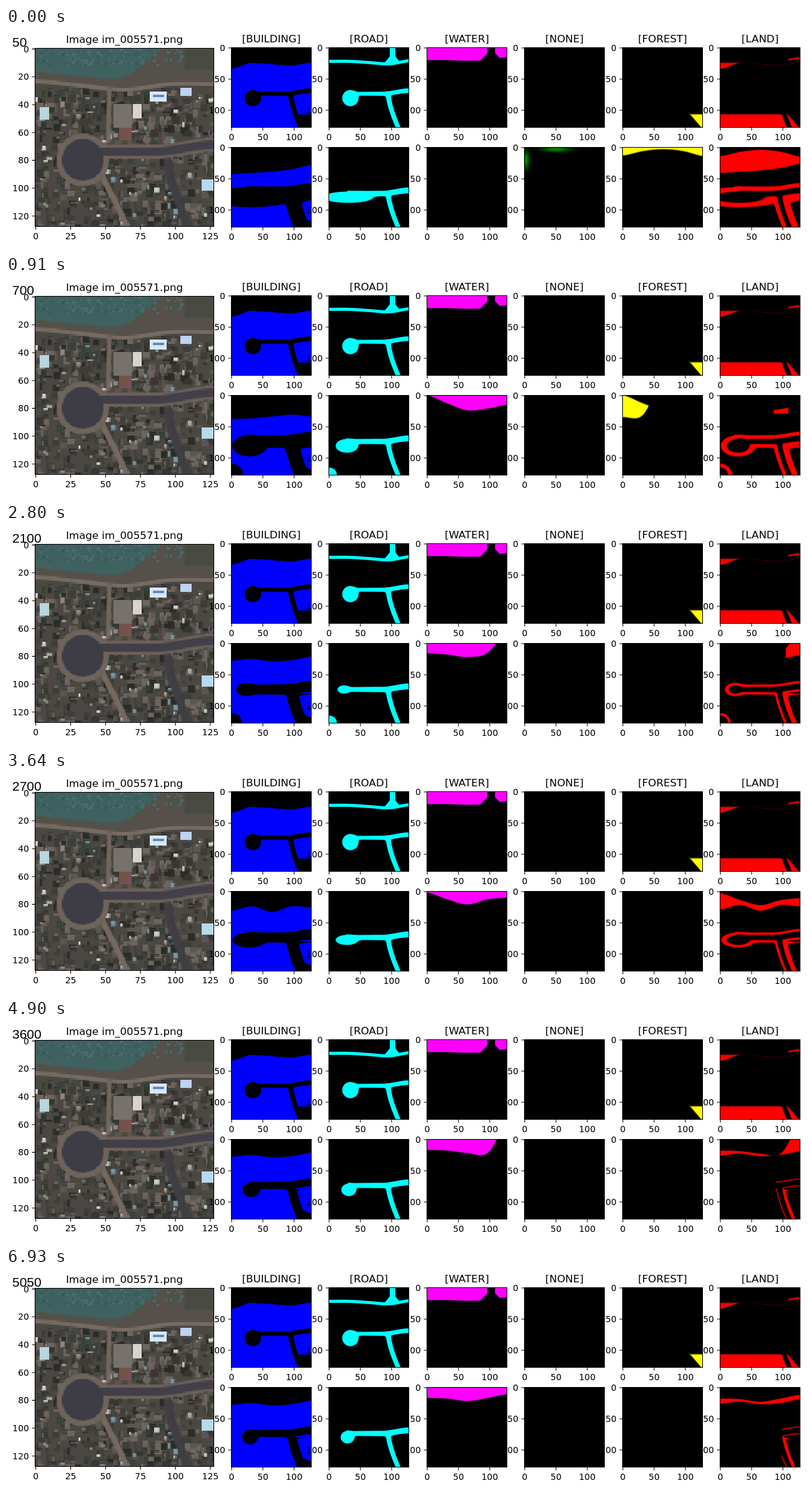
An HTML page with a canvas that plays this animation: 1280x353 px, repeating every 7 s.

```html
<!DOCTYPE html>
<html lang="en">
<head>
<meta charset="utf-8">
<title>Segmentation training</title>
<style>
html, body { margin: 0; width: 100%; height: 100%; overflow: hidden; background: #fff; }
canvas, svg { position: absolute; left: 0; top: 0; }
canvas { image-rendering: pixelated; background: #000; }
svg { width: 1280px; height: 353px; font-family: "DejaVu Sans", sans-serif; }
#count { font: 21px "Liberation Sans", Arial, sans-serif; }
</style>
</head>
<body>
<svg viewBox="0 0 1280 353"><path id="axes" fill="none" stroke="#000" stroke-width="1.1"/><text id="count" x="10" y="30"></text></svg>
<script>
const N = 128, STEP = 70, STEPS = 100;
const svg = document.querySelector('svg');
const count = document.getElementById('count');

const classes = [
  { name: 'BUILDING', rgb: [0, 0, 255], soft: 1 },
  { name: 'ROAD', rgb: [0, 255, 255], soft: 1 },
  { name: 'WATER', rgb: [255, 0, 255], soft: 1.4 },
  { name: 'NONE', rgb: [0, 140, 0], soft: 1 },
  { name: 'FOREST', rgb: [255, 255, 0], soft: 2.5 },
  { name: 'LAND', rgb: [255, 0, 0], soft: 1.8 }
];

// coast, water and trees are heights at five even places; bulb is x, y and radii
// of the turning circle; gap is bare land kept around roads; shore and verge are
// the x ranges where land shows.
const base = {
  coast: [28, 25, 29, 27, 21], water: [17, 18, 22, 17, 11], trees: Array(5).fill(-30),
  bulb: [29, 80, 11, 10], half: 3.5, gap: 1.5, corner: -9, haze: -5,
  shore: [-9, 140], verge: [-9, 140]
};
const poses = [
  { step: 0, coast: [43, 41, 39, 35, 28], water: Array(5).fill(-20), trees: [13, 6, 3, 6, 14],
    bulb: [30, 80, 40, 9], gap: 7, haze: 10 },
  { step: 13, coast: [38, 37, 34, 31, 34], water: [0, 13, 24, 21, 15], trees: [35, 31, -30, -30, -30],
    bulb: [28, 81, 18, 11], gap: 6, corner: 12, shore: [85, 108] },
  { step: 26, water: [10, 17, 23, 15, 8], bulb: [28, 77, 11, 11], gap: 3, shore: [94, 140], verge: [-9, 36] },
  { step: 40, water: [16, 18, 22, 15, -20], bulb: [23, 74, 10, 6.5], gap: 4, corner: 12, shore: [104, 140] },
  { step: 52, coast: [31, 24, 33, 24, 26], water: [2, 13, 21, 13, 10], bulb: [28, 78, 18, 8], gap: 4 },
  { step: 70, water: [17, 18, 22, 22, -25], bulb: [31, 81, 12, 10], verge: [89, 140] },
  { step: 99, verge: [98, 140] }
].map(p => ({ ...base, ...p }));
const truth = { ...base, coast: [34, 24, 26, 28, 23], water: [20, 20, 21, 20, 15],
  bulb: [33.5, 81, 13, 13], half: 2.5, gap: 0, shore: [200, 0] };
const truthLane = [22, 22, 24, 26, 21];

const clamp = (v, lo, hi) => Math.min(hi, Math.max(lo, v));

function seeded(seed) {
  return () => {
    seed = (seed + 0x6D2B79F5) | 0;
    let r = Math.imul(seed ^ seed >>> 15, seed | 1);
    r ^= r + Math.imul(r ^ r >>> 7, r | 61);
    return ((r ^ r >>> 14) >>> 0) / 4294967296;
  };
}

// Catmull-Rom height at x.
function curve(v, x) {
  const s = x / N * (v.length - 1), i = Math.floor(s), t = s - i;
  const at = k => v[clamp(k, 0, v.length - 1)];
  const [a, b, c, d] = [at(i - 1), at(i), at(i + 1), at(i + 2)];
  return b + t / 2 * (c - a + t * (2 * a - 5 * b + 4 * c - d + t * (3 * (b - c) + d - a)));
}

function softMin(a, b) {
  const h = Math.max(4 - Math.abs(a - b), 0);
  return Math.min(a, b) - h * h / 16;
}

function mix(a, b, blend) {
  return Array.isArray(a) ? a.map((v, i) => blend(v, b[i])) : blend(a, b);
}

const branchAt = y => 94 + 16 * Math.max(0, (y - 74) / 54) ** 1.5;

function roadAt(x) {
  const t = clamp((x - 85) / 43, 0, 1);
  return 74 - 5 * t * t * (3 - 2 * t);
}

function roadDistance(p, x, y) {
  const [bx, by, rx, ry] = p.bulb, mid = roadAt(x);
  const bulb = (Math.hypot((x - bx) / rx, (y - by) / ry) - 1) * Math.min(rx, ry);
  const main = Math.max(Math.abs(y - mid) - p.half - x / 100, bx - x);
  const branch = Math.max(Math.abs(x - branchAt(y)) - 4, mid - y);
  return Math.min(softMin(softMin(bulb, main), branch), Math.hypot(x, y - N) - p.corner);
}

// Fields of all classes at a pixel, positive inside.
function model(p) {
  const real = p === truth;
  const row = v => Array.from({ length: N }, (_, x) => curve(v, x));
  const [coasts, seas, woods, lanes] = [p.coast, p.water, p.trees, truthLane].map(row);
  const bump = (u, v) => Math.exp(-u * u - v * v);

  return (x, y) => {
    const coast = coasts[x], sea = seas[x], wood = woods[x];
    const d = roadDistance(p, x, y), right = x - branchAt(y);
    const reach = p.gap + (!real && right > 0 && y > 80 ? 4 : 0);
    const lot = 107 + (real ? 0 : 0.45 * (x - 100));
    let building = Math.min(y - coast, d - reach, right > 0 && y > 85 ? lot - y : N);
    let road = -d, water = sea - y;
    let forest = Math.min(wood - y, y - sea);
    const none = p.haze / 10 * (bump((x - 50) / 22, (y - 3) / 4) + bump((x - 2) / 5, (y - 20) / 14)) - 0.5;
    let land = Math.max(
      Math.min(y - Math.max(sea, wood) - 1, coast - 2 - y, x - p.shore[0], p.shore[1] - x),
      Math.min(d, reach - d, x - p.verge[0], p.verge[1] - x));

    if (real) {
      const lane = lanes[x], slope = 108 + 0.85 * (y - 108) - x;
      const up = 4.5 + Math.max(0, y - 14) * 0.8 - Math.abs(x - 101);
      road = Math.max(road, 2.5 - Math.abs(y - lane), Math.min(up, lane - y));
      building = Math.min(building, y - lane - 2.5);
      water = Math.min(water, Math.abs(x - 102) - 6 - Math.max(0, y - 9));
      forest = Math.min(y - lot, -slope);
      land = Math.max(Math.min(y - lot, slope, d), Math.min(y - lane - 2.5, coast - y),
        x > 108 ? Math.min(y - sea, sea + 2.5 - y) : -1);
    }
    return [building, road, water, none, forest, land];
  };
}

function paint(targets, at) {
  const images = targets.map(g => g.createImageData(N, N));
  for (let i = 0; i < N * N; i++) {
    at(i % N, Math.floor(i / N)).forEach((v, c) => {
      const { rgb, soft } = classes[c], a = clamp(v / soft + 0.5, 0, 1);
      images[c].data.set([rgb[0] * a, rgb[1] * a, rgb[2] * a, 255], 4 * i);
    });
  }
  targets.forEach((g, c) => g.putImageData(images[c], 0, 0));
}

function canvasAt(x, y, size) {
  const c = document.createElement('canvas');
  c.width = c.height = N;
  c.style.cssText = `left:${x}px;top:${y}px;width:${size}px;height:${size}px`;
  document.body.insertBefore(c, svg);
  return c.getContext('2d');
}

function drawPhoto(g) {
  const rand = seeded(71);
  const scatter = (n, colors, top, height, size) => {
    for (let i = 0; i < n; i++) {
      g.fillStyle = colors[Math.floor(rand() * colors.length)];
      g.fillRect(Math.floor(rand() * N), Math.floor(top + rand() * height), 1 + rand() * size, 1 + rand() * size);
    }
  };
  const block = (color, x, y, w, h) => { g.fillStyle = color; g.fillRect(x, y, w, h); };
  const disc = (color, r) => { g.beginPath(); g.arc(34, 80, r, 0, 7); g.fillStyle = color; g.fill(); };
  // Strip between two heights, given as functions of x.
  const strip = (color, top, bottom) => {
    for (let x = 0; x < N; x++) block(color, x, top(x), 1, bottom(x) - top(x));
  };
  const line = (color, w, x1, y1, x2, y2) => {
    g.strokeStyle = color;
    g.lineWidth = w;
    g.beginPath();
    g.moveTo(x1, y1);
    g.lineTo(x2, y2);
    g.stroke();
  };

  block('#4b4743', 0, 0, N, N);
  scatter(800, ['#2b2c28', '#363731', '#403d39', '#5b5650', '#6d655e', '#3a403b'], 28, 100, 5);
  scatter(80, ['#aaa49c', '#d0ccc5', '#8d857f', '#7596a2'], 32, 96, 3);
  const shore = x => curve([17, 20, 20, -3, -3], x), bank = x => curve([22, 25, 28, 24, 24], x);
  strip('#55504a', () => 0, bank);
  strip('#3f615f', () => 0, shore);
  scatter(160, ['#4c706f', '#36595b'], 0, 12, 1);
  strip('#494a42', () => 0, x => x > 106 ? 15 : 0);
  strip('#766b62', bank, x => bank(x) + 3);
  line('#72665f', 3, 53, 28, 52, 68);
  line('#74685f', 4, 47, 90, 66, N);
  for (let y = 74; y < N; y++) block('#403d43', branchAt(y) - 3, y, 6, 1);
  strip('#6a6059', x => x > 40 ? roadAt(x) - 5 : 0, x => x > 40 ? roadAt(x) + 5 : 0);
  disc('#6f645c', 19);
  strip('#423f48', x => x > 40 ? roadAt(x) - 3 : 0, x => x > 40 ? roadAt(x) + 3 : 0);
  disc('#3e3c44', 15);
  block('#77716b', 56, 40, 13, 17);
  block('#d8d3cc', 70, 40, 6, 10);
  block('#76524c', 60, 57, 9, 9);
  block('#dce7ef', 82, 31, 12, 7);
  block('#638bc4', 84, 33, 8, 2);
  block('#bcd3ef', 104, 28, 8, 6);
  block('#b9d5dd', 3, 42, 7, 9);
  block('#b9d9ea', 119, 94, 9, 8);
}

function text(x, y, str, size, anchor) {
  const t = document.createElementNS(svg.namespaceURI, 'text');
  t.textContent = str;
  for (const [k, v] of Object.entries({ x, y, 'font-size': size, 'text-anchor': anchor })) t.setAttribute(k, v);
  svg.append(t);
}

let axes = '';
function frame(x, y, size, xTicks, yTicks) {
  const scale = size / N, end = y + size;
  axes += `M${x} ${y}h${size}v${size}h${-size}z`;
  for (const v of xTicks) {
    const p = x + (v + 0.5) * scale;
    axes += `M${p} ${end}v5`;
    text(p, end + 20.8, v, 13.89, 'middle');
  }
  for (const v of yTicks) {
    const p = y + (v + 0.5) * scale;
    axes += `M${x} ${p}h-5`;
    text(x - 9.7, p + 5, v, 13.89, 'end');
  }
}

const every = (gap, n) => Array.from({ length: n }, (_, i) => i * gap);

drawPhoto(canvasAt(46.5, 32.5, 286));
frame(46.5, 32.5, 286, every(25, 6), every(20, 7));
text(189.5, 24, 'Image im_005571.png', 16.67, 'middle');

const upper = [], lower = [];
classes.forEach(({ name }, i) => {
  const left = Math.round(360.5 + 156.55 * i);
  for (const [list, top] of [[upper, 31], [lower, 191]]) {
    list.push(canvasAt(left, top, N));
    frame(left - 0.5, top + 0.5, N, every(50, 3), every(50, 3));
  }
  text(left + 63.5, 23, `[${name}]`, 16.67, 'middle');
});
document.getElementById('axes').setAttribute('d', axes);
paint(upper, model(truth));

function render(step) {
  count.textContent = 50 * (step + (step < 33 ? 1 : 2));
  let k = 0;
  while (k < poses.length - 2 && step >= poses[k + 1].step) k++;
  const a = poses[k], b = poses[k + 1];
  const u = (step - a.step) / (b.step - a.step);
  const sway = 3 * Math.sin(Math.PI * u), rand = seeded(step);
  const blend = (v, w) => v + (w - v) * u + sway * (rand() - 0.5);
  const pose = {};
  for (const key in base) pose[key] = mix(a[key], b[key], blend);
  paint(lower, model(pose));
}

let shown = -1;
const start = performance.now();
function tick() {
  const step = Math.floor((performance.now() - start) / STEP) % STEPS;
  if (step !== shown) render(shown = step);
  requestAnimationFrame(tick);
}
tick();
</script>
</body>
</html>
```
